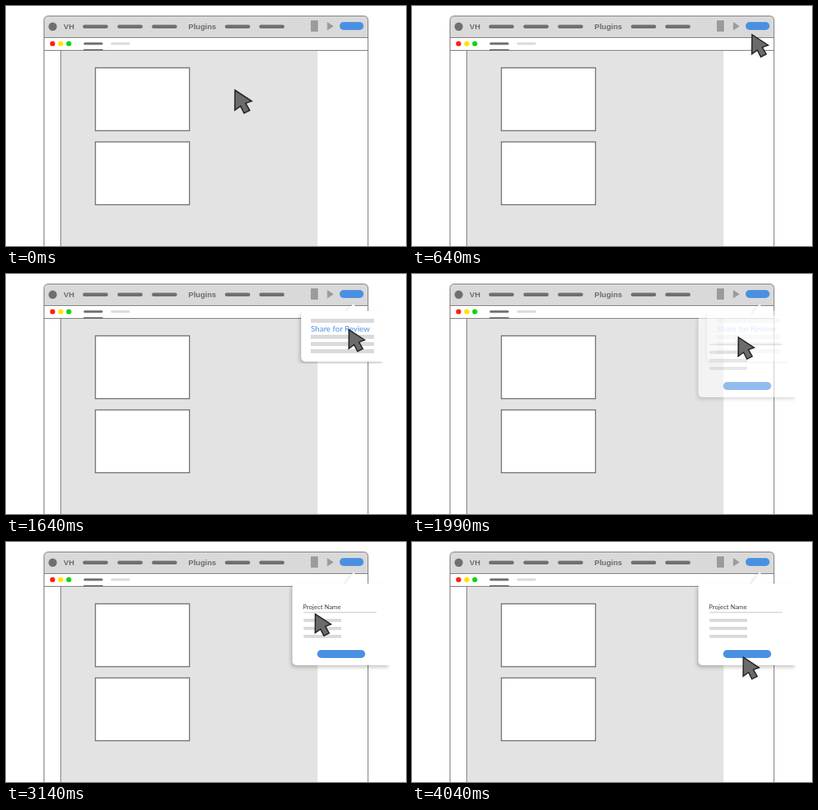
Animation of 500x300 px, one loop 4.54 s. Source, as an HTML page:

```html
<!DOCTYPE html>
<html lang="en">
<head>
<meta charset="utf-8">
<title>Share for review</title>
<style>
  html, body { margin: 0; width: 100%; height: 100%; overflow: hidden; background: #fff; }
  svg { display: block; width: 100%; height: 100%; }
  .dark { fill: #6f6f6f; }
  .light { fill: #dadada; }
  .blue { fill: #4a90e2; }
  .menu { font: bold 9.6px "Liberation Sans", Arial, sans-serif; fill: #6a6a6a; }
  .lato { font-family: Lato, sans-serif; }
  .artboard { fill: #fff; stroke: #707070; stroke-width: 1.3; }
  .card { fill: #fff; filter: drop-shadow(-2px 3px 2px rgba(0, 0, 0, .2)); }
</style>
</head>
<body>
<svg viewBox="0 0 500 300">
  <defs>
    <clipPath id="cardArea"><path d="M340 30H472V112H340Z"/></clipPath>
    <clipPath id="formArea"><path d="M340 30H480V165H340Z"/></clipPath>
  </defs>

  <!-- window -->
  <path d="M47.5 301V17.5a5 5 0 0 1 5-5H447.5a5 5 0 0 1 5 5V301" fill="#fff"/>
  <path d="M48 39V17.5a5 5 0 0 1 5-5H447.5a5 5 0 0 1 5 5V39Z" fill="#d9d9d9"/>
  <path d="M68 56H389.5V300H68Z" fill="#e3e3e3"/>
  <path d="M47.5 301V17.5a5 5 0 0 1 5-5H447.5a5 5 0 0 1 5 5V301M48 39.5H452M48 55.5H452M68.5 56V300"
        fill="none" stroke="#808080"/>
  <rect class="artboard" x="111.7" y="77.3" width="117.7" height="78.5"/>
  <rect class="artboard" x="111.7" y="169.9" width="117.7" height="78.5"/>

  <!-- toolbar -->
  <circle class="dark" cx="58.4" cy="25.7" r="5.2"/>
  <text class="menu" x="72" y="29">VH</text>
  <text class="menu" x="228" y="29">Plugins</text>
  <g class="dark">
    <rect x="96" y="23.5" width="31.5" height="4.4" rx="2.2"/>
    <rect x="139.3" y="23.5" width="31.5" height="4.4" rx="2.2"/>
    <rect x="182.3" y="23.5" width="31.5" height="4.4" rx="2.2"/>
    <rect x="273.7" y="23.5" width="31.5" height="4.4" rx="2.2"/>
    <rect x="316.5" y="23.5" width="31.5" height="4.4" rx="2.2"/>
    <rect x="97" y="45.6" width="24" height="3" rx="1.5"/>
    <rect x="97" y="54" width="24" height="2"/>
  </g>
  <rect class="light" x="131" y="45.6" width="24" height="3" rx="1.5"/>
  <path d="M381 18H390V32H381ZM401.5 20L409.6 25.3L401.5 30.6Z" fill="#9b9b9b"/>
  <rect class="blue" x="417" y="20" width="30" height="10" rx="5"/>
  <circle cx="58.2" cy="47.1" r="3.2" fill="#ff2010"/>
  <circle cx="68.4" cy="47.1" r="3.2" fill="#ffe400"/>
  <circle cx="78.5" cy="47.1" r="3.2" fill="#14d214"/>

  <g id="shareMenu" opacity="0" clip-path="url(#cardArea)">
    <path class="card" d="M374 46H426L434 37.5L442 46H472V109.5H374a5 5 0 0 1-5-5V51a5 5 0 0 1 5-5Z"/>
    <path class="light" d="M381 56H460V61H381ZM381 76H460V81H381ZM381 85H460V90H381ZM381 94H460V99H381Z"/>
    <text class="lato blue" x="381" y="72" font-size="10">Share for Review</text>
  </g>

  <g id="shareForm" opacity="0" clip-path="url(#formArea)">
    <path class="card" d="M363 52H424.5L434.5 37.5L444.5 52H480V154H363a5 5 0 0 1-5-5V57a5 5 0 0 1 5-5Z"/>
    <path class="light" d="M372 96H419V100H372ZM372 106H419V110H372ZM372 116H419V120H372Z"/>
    <path d="M372 87H463V89H372Z" fill="#e2e2e2"/>
    <rect class="blue" x="389" y="135" width="60" height="10" rx="5"/>
    <text id="projectName" class="lato" x="371" y="84" font-size="8" fill="#3c3c3c" opacity="0">Project Name</text>
  </g>

  <path id="cursor" d="M1.2 1.2L20.8 14L13.7 16.6L18.5 25L11.9 28.3L7.7 20L1 24.8Z"
        fill="#6b6b6b" stroke="#242424" stroke-width="1.5"/>
</svg>
<script>
  const LOOP = 4540, TICK = 50, OFFSET = 40;
  const byId = id => document.getElementById(id);
  const [shareMenu, shareForm, projectName, cursor] =
    ["shareMenu", "shareForm", "projectName", "cursor"].map(byId);

  // Each move: start, end, target x, y and scale
  const home = [285, 104, 1.06];
  const moves = [
    { from: 40, to: 790, pose: [438.5, 27.3, 1.02] },
    { from: 1190, to: 1650, pose: [427.5, 68.5, 1] },
    { from: 1690, to: 2300, pose: [385, 88, 1] },
    { from: 3065, to: 4010, pose: [413, 143, 1] }
  ];

  const ramp = (t, from, to) => Math.min(1, Math.max(0, (t - from) / (to - from)));
  const ease = p => (1 - Math.cos(Math.PI * p)) / 2;
  const fade = (node, value) => node.setAttribute("opacity", value);

  function cursorPose(t) {
    return moves.reduce((pose, { from, to, pose: target }) => {
      const p = ease(ramp(t, from, to));
      return pose.map((v, i) => v + (target[i] - v) * p);
    }, home);
  }

  function draw(now) {
    const elapsed = now % LOOP;
    // The picture advances in 50 ms ticks
    const t = Math.max(0, Math.floor((elapsed - OFFSET) / TICK) * TICK + OFFSET);
    const [x, y, scale] = cursorPose(t);
    cursor.setAttribute("transform", `translate(${x} ${y}) scale(${scale})`);
    fade(shareMenu, ramp(t, 740, 1140) * (1 - ramp(t, 1740, 2190)));
    fade(shareForm, ramp(t, 1690, 2190));
    fade(projectName, t < 2640 ? 0 : Math.max(0.15, ramp(t, 2650, 3130)));
  }

  const start = performance.now();
  function play() {
    draw(performance.now() - start);
    requestAnimationFrame(play);
  }
  play();
</script>
</body>
</html>
```
